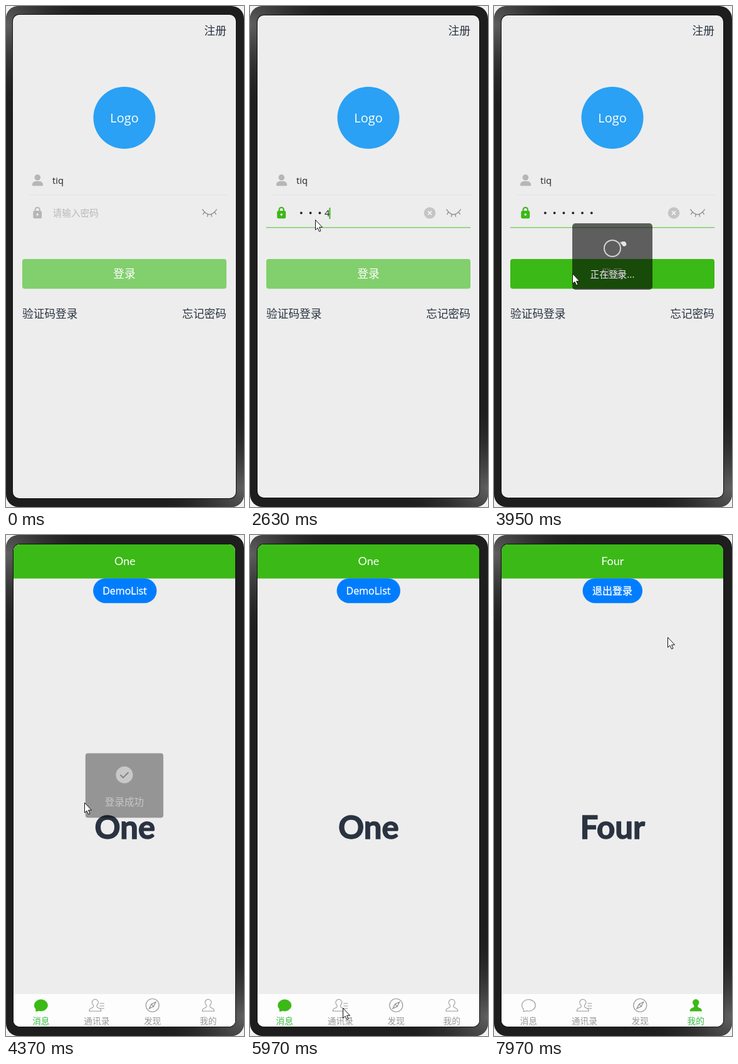
Animation of 380 by 800 pixels, one loop 8000 ms. Source, as an HTML page with a canvas:

```html
<!DOCTYPE html>
<html lang="zh">
<head>
<meta charset="utf-8">
<title>Login demo</title>
<style>
html, body { margin: 0; width: 100%; height: 100%; overflow: hidden; background: #f2f2f2; }
canvas { display: block; width: 100%; height: 100%; }
</style>
</head>
<body>
<canvas id="stage" width="380" height="800"></canvas>
<script>
const c = document.getElementById('stage').getContext('2d');
const { PI, sin, cos, abs, round, min, max, floor } = Math;
const GREEN = '#3bb916', PALE = '#82cf6d', INK = '#2a3341', BG = '#ededed', GREY = '#999', SOFT = '#b6b6b6';
const CJK = '"Noto Sans CJK SC", "Noto Sans CJK", sans-serif';
const LATO = 'Lato, sans-serif';
const OPEN = '"Open Sans", sans-serif';
const MID = 189;

// Moments of the story in ms
const LOOP = 8000;
const AT = { focus: 1080, blink: 1600, wake: 1650, login: 3720, home: 4150, toast: 4300, fade: 5580 };
const TAB_TIMES = [AT.home, 6380, 7220, 7700];
const KEY = { first: 1790, gap: 280, show: 50, count: 6 };

const ramp = (t, a, b) => max(0, min(1, (t - a) / (b - a)));
const smooth = k => k * k * (3 - 2 * k);

// `bold` thickens the glyphs by that many pixels
function text(s, x, y, size, color, { font = OPEN, weight = 400, align = 'center', bold = 0 } = {}) {
  c.font = `${weight} ${size}px ${font}`;
  c.textAlign = align;
  c.fillStyle = c.strokeStyle = color;
  c.fillText(s, x, y);
  if (bold) {
    c.lineWidth = bold;
    c.strokeText(s, x, y);
  }
}
// Chinese text, placed by the middle of its glyphs
const hanzi = (s, x, mid, size, color, opt = {}) =>
  text(s, x, mid + size * 0.38, size, color, { font: CJK, ...opt });

function box(x, y, w, h, r, fill) {
  c.beginPath();
  c.roundRect(x, y, w, h, r);
  c.fillStyle = fill;
  c.fill();
}
function disc(x, y, r, fill) {
  c.beginPath();
  c.arc(x, y, r, 0, 2 * PI);
  c.fillStyle = fill;
  c.fill();
}
function ring(x, y, r, color, width) {
  c.beginPath();
  c.arc(x, y, r, 0, 2 * PI);
  c.strokeStyle = color;
  c.lineWidth = width;
  c.stroke();
}
function line(points, color, width) {
  c.beginPath();
  points.forEach(([x, y]) => c.lineTo(x, y));
  c.strokeStyle = color;
  c.lineWidth = width;
  c.stroke();
}
function at(x, y, paint) {
  c.save();
  c.translate(x, y);
  paint();
  c.restore();
}

function lock(color) {
  at(50.2, 327, () => {
    box(-6.9, 0, 13.8, 12.3, 2.5, color);
    c.beginPath();
    c.arc(0, -1.7, 3.6, PI, 0);
    c.lineTo(3.6, 1);
    c.moveTo(-3.6, 1);
    c.lineTo(-3.6, -1.7);
    c.strokeStyle = color;
    c.lineWidth = 2;
    c.stroke();
    disc(0, 6, 1.8, BG);
  });
}

function closedEye() {
  const lid = x => 8.3 - 8.3 * (x / 11.5) ** 2;
  at(325, 324.5, () => {
    const curve = Array.from({ length: 24 }, (_, i) => [i - 11.5, lid(i - 11.5)]);
    line(curve, '#929292', 1.5);
    for (const x of [-8, -2.7, 2.7, 8])
      line([[x, lid(x)], [x * 1.33, lid(x) + 4.4]], '#929292', 1.4);
  });
}

// Each typed digit shows briefly, then turns into a dot
function typed(t) {
  const since = t - KEY.first;
  const count = max(0, min(KEY.count, floor(since / KEY.gap) + 1));
  const shown = count > 0 && since - (count - 1) * KEY.gap < KEY.show;
  return { count, shown };
}

function password(t) {
  const { count, shown } = typed(t);
  if (!count) {
    hanzi('请输入密码', 74.5, 330.5, 14.7, '#b9b9b9', { align: 'left' });
    if (t >= AT.focus && t < AT.blink) box(74, 322, 2, 19, 0, GREEN);
    return;
  }
  const dots = count - shown, pitch = 14.8;
  for (let i = 0; i < dots; i++) disc(81.8 + pitch * i, 330.5, 1.9, '#222');
  const end = 74 + pitch * dots;
  if (shown) text(count, end + 0.5, 336, 14.7, '#222', { align: 'left' });
  if (t < AT.login) box(end + 8 * shown, 322, 2, 18, 0, GREEN);
  disc(287, 330.5, 9.3, '#c5c5c5');
  for (const s of [-3, 3]) line([[287 - s, 327.5], [287 + s, 333.5]], '#fff', 1.3);
}

function login(t) {
  box(0, 0, 380, 800, 0, BG);
  hanzi('注册', 352, 39, 17.7, INK, { align: 'right' });
  disc(MID, 178.5, 49.5, '#2aa1f5');
  text('Logo', MID, 185.5, 20, '#fff');

  disc(50.3, 273.8, 4.8, SOFT);
  box(41.8, 279.8, 17.4, 7.4, [6, 6, 1.5, 1.5], SOFT);
  text('tiq', 74, 283.5, 14.7, '#222', { align: 'left' });
  box(36, 301, 319, 1, 0, '#e4e4e4');

  lock(SOFT);
  c.globalAlpha = ramp(t, AT.focus, AT.focus + 150);
  lock(GREEN);
  box(26, 353, 326, 1.5, 0, '#7dcf66');
  c.globalAlpha = 1;
  password(t);
  closedEye();

  box(26, 404, 326, 47.5, 4, typed(t).count < KEY.count ? PALE : GREEN);
  hanzi('登录', MID, 427.5, 17.7, '#fff');
  hanzi('验证码登录', 26, 491.5, 17.7, INK, { align: 'left' });
  hanzi('忘记密码', 352, 491.5, 17.7, INK, { align: 'right' });
}

function loading(t) {
  c.globalAlpha = ramp(t, AT.login - 30, AT.login + 70);
  box(125, 347, 128, 106, 5, 'rgba(0,0,0,.6)');
  at(MID, 387, () => {
    ring(0, 0, 13, '#d2d2d2', 2);
    // small body with a tail on a tilted orbit
    c.rotate(-0.35);
    for (let i = 9; i >= 0; i--) {
      const a = (t - 3950) / 1200 * 2 * PI - i * 0.09;
      disc(20 * cos(a), 6 * sin(a), 3.5 - i * 0.25, `rgba(230,230,230,${1 - i * 0.1})`);
    }
  });
  hanzi('正在登录...', MID, 428.5, 14.7, '#e8e8e8');
  c.globalAlpha = 1;
}

function toast(t) {
  c.globalAlpha = ramp(t, AT.toast, AT.toast + 150) * (1 - ramp(t, AT.fade, AT.fade + 200));
  box(126.8, 348.6, 124.4, 102.8, 4, 'rgba(0,0,0,.79)');
  disc(MID, 383, 13.6, '#fff');
  line([[182.5, 383], [187, 387.5], [195.5, 379]], '#333', 1.8);
  hanzi('登录成功', MID, 426.5, 15.6, '#fff');
  c.globalAlpha = 1;
}

// Tab icons are drawn around their own centre
const bubble = new Path2D();
bubble.ellipse(0, 0, 10.8, 9.2, 0, 0.78 * PI, 2.6 * PI);
bubble.lineTo(-8, 10);
bubble.closePath();

const person = new Path2D();
person.arc(0, -4.5, 5, 0.72 * PI, 2.28 * PI);
person.quadraticCurveTo(1.5, 3, 5, 4);
person.quadraticCurveTo(9.5, 5.3, 9.5, 9.3);
person.lineTo(-9.5, 9.3);
person.quadraticCurveTo(-9.5, 5.3, -5, 4);
person.quadraticCurveTo(-1.5, 3, -3.2, -0.6);
person.closePath();

function shape(path, color, on) {
  c.fillStyle = c.strokeStyle = color;
  c.lineWidth = on ? 0.5 : 1.1;
  if (on) c.fill(path);
  c.stroke(path);
}

const ICONS = [
  (color, on) => shape(bubble, color, on),
  (color, on) => {
    at(-2.5, 0, () => shape(person, color, on));
    for (const y of [-3, 1, 5]) line([[5, y], [12, y]], color, on ? 1.8 : 1.2);
  },
  (color, on) => {
    if (on) disc(0, 0, 10.5, color);
    ring(0, 0, 10.5, color, 1.2);
    c.rotate(PI / 4);
    line([[0, -7.5], [2.6, 0], [0, 7.5], [-2.6, 0], [0, -7.5], [2.6, 0], [-2.6, 0]], on ? '#fff' : '#8a8a8a', 1.2);
  },
  (color, on) => shape(person, color, on)
];
const TABS = [['One', '消息'], ['Two', '通讯录'], ['Three', '发现'], ['Four', '我的']];

function pill(w) {
  box(MID + 0.3 - w / 2, 69.3, w, 39.5, 20, '#007dff');
}

function home(t) {
  const tab = max(0, TAB_TIMES.filter(s => t >= s).length - 1);
  const title = TABS[tab][0];
  const hasButton = tab === 0 || tab === 3;
  box(0, 0, 380, 800, 0, BG);
  box(0, 0, 380, 69.4, 0, GREEN);
  text(title, MID + 0.3, 48, 18, '#fff', { font: LATO });
  if (tab === 0) {
    pill(101.5);
    text('DemoList', MID, 95, 16, '#fff', { weight: 500, bold: 0.3 });
  } else if (tab === 3) {
    pill(95.5);
    hanzi('退出登录', MID, 89, 16, '#fff', { weight: 500, bold: 0.3 });
  }
  text(title, MID + 0.3, 445 + 40 * hasButton, 51, INK, { font: LATO, weight: 700, bold: 1.4 });
  box(0, 733, 380, 60, 0, '#fdfdfd');
  TABS.forEach(([, label], i) => {
    const x = 55.3 + 89 * i, on = i === tab;
    at(x, 751, () => ICONS[i](on ? GREEN : GREY, on));
    hanzi(label, x, 775.5, 13.7, on ? '#34bc40' : GREY);
  });
}

function bezel() {
  box(0, 0, 380, 800, 0, '#f2f2f2');
  box(0, 0, 380, 800, 20, '#1e1e1e');
  // the same soft shine on two opposite corners
  for (const turn of [0, PI]) {
    at(190, 400, () => {
      c.rotate(turn);
      const g = c.createRadialGradient(-190, -370, 0, -190, -370, 140);
      g.addColorStop(0, '#606060');
      g.addColorStop(1, 'rgba(30,30,30,0)');
      box(-190, -400, 380, 800, 20, g);
    });
  }
}

// Pointer moves: start, end, where to, sideways bow
const ENTRY = [29, 604];
const MOVES = [
  [150, 720, 104, 341, 90],
  [3080, 3250, 128, 447],
  [3480, 3570, 125, 427],
  [4380, 4500, 124, 456],
  [4550, 5000, 148, 755],
  [6400, 6820, 246, 754],
  [7240, 7450, 321, 757],
  [7710, 7970, 277, 163, 30]
];
const arrow = new Path2D('M.5 .5V16.5L4 13.3L6.5 19L9 18L6.6 12.3H11.5Z');

function pointer(t) {
  if (t < MOVES[0][0]) return;
  let [x, y] = ENTRY;
  for (const [from, to, tx, ty, bow = 0] of MOVES) {
    const k = smooth(ramp(t, from, to));
    x += (tx - x) * k + bow * sin(PI * k);
    y += (ty - y) * k;
  }
  at(round(x), round(y), () => {
    c.fillStyle = '#fff';
    c.fill(arrow);
    c.strokeStyle = '#111';
    c.lineWidth = 1;
    c.stroke(arrow);
  });
}

function draw(t) {
  bezel();
  const inset = t < AT.wake ? 0 : 1;
  c.save();
  c.beginPath();
  c.roundRect(11 + inset, 14 + inset, 356 - 2 * inset, 772 - 2 * inset, 10);
  c.strokeStyle = '#111';
  c.lineWidth = 2;
  c.stroke();
  c.clip();
  const slide = 1 - (1 - ramp(t, AT.home, AT.home + 250)) ** 3;
  if (slide < 1) login(t);
  if (t >= AT.login && t < AT.home) loading(t);
  if (slide > 0) at((1 - slide) * 356, 0, () => home(t));
  toast(t);
  c.restore();
  pointer(t);
}

const start = performance.now();
function tick() {
  draw((performance.now() - start) % LOOP);
  requestAnimationFrame(tick);
}
tick();
</script>
</body>
</html>
```
